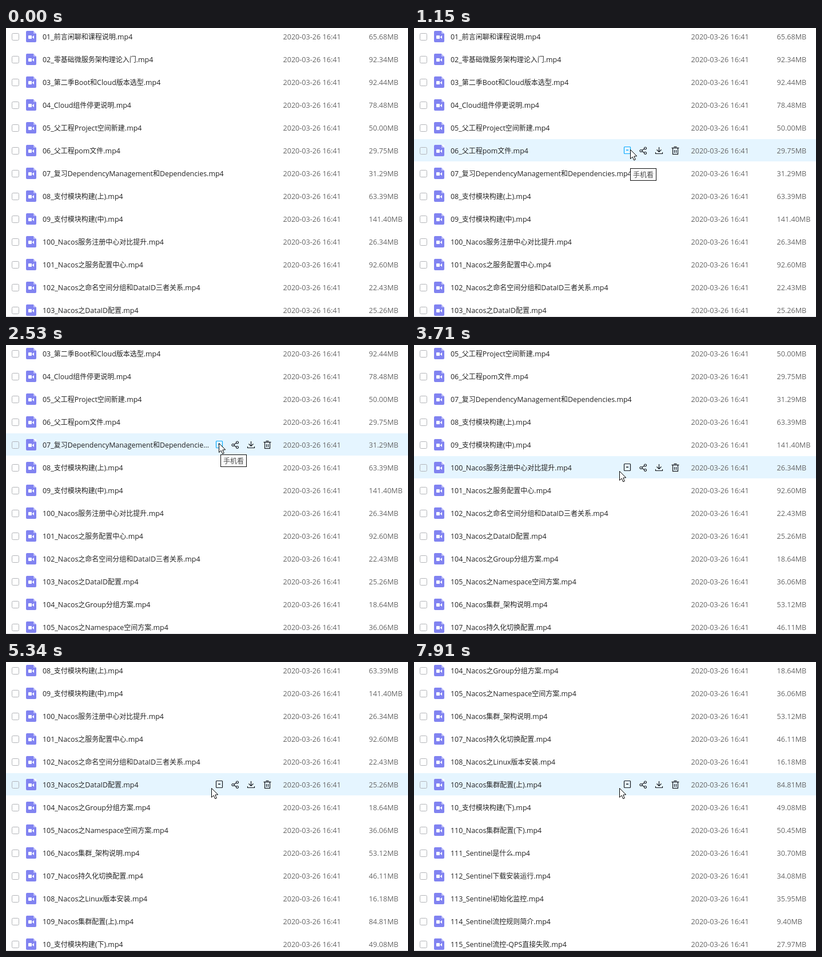
Animation of 703x507 px, one loop 8 s. Source, as an HTML page with a canvas:

```html
<!DOCTYPE html>
<html lang="zh-CN">
<head>
<meta charset="utf-8">
<style>
  html, body { margin: 0; width: 100%; height: 100%; overflow: hidden; background: #fff; }
  canvas { display: block; }
</style>
</head>
<body>
<canvas id="stage" width="703" height="507"></canvas>
<script>
const ctx = document.getElementById('stage').getContext('2d');
const LOOP = 8000, ROW = 40, VISIBLE = 13;
const DATE = '2020-03-26 16:41';
const BLUE = '#09aaff', INK = '#16181c';

const files = `01_前言闲聊和课程说明|65.68
02_零基础微服务架构理论入门|92.34
03_第二季Boot和Cloud版本选型|92.44
04_Cloud组件停更说明|78.48
05_父工程Project空间新建|50.00
06_父工程pom文件|29.75
07_复习DependencyManagement和Dependencies|31.29
08_支付模块构建(上)|63.39
09_支付模块构建(中)|141.40
100_Nacos服务注册中心对比提升|26.34
101_Nacos之服务配置中心|92.60
102_Nacos之命名空间分组和DataID三者关系|22.43
103_Nacos之DataID配置|25.26
104_Nacos之Group分组方案|18.64
105_Nacos之Namespace空间方案|36.06
106_Nacos集群_架构说明|53.12
107_Nacos持久化切换配置|46.11
108_Nacos之Linux版本安装|16.18
109_Nacos集群配置(上)|84.81
10_支付模块构建(下)|49.08
110_Nacos集群配置(下)|50.45
111_Sentinel是什么|30.70
112_Sentinel下载安装运行|34.08
113_Sentinel初始化监控|35.95
114_Sentinel流控规则简介|9.40
115_Sentinel流控-QPS直接失败|27.97`.split('\n').map(line => {
  const [name, size] = line.split('|');
  return { name: name + '.mp4', size: size + 'MB' };
});

// Wheel turns; every step moves the list by one row.
const wheel = [
  { start: 1760, steps: 2, gap: 80 },
  { start: 2770, steps: 1, gap: 1 },
  { start: 3710, steps: 6, gap: 543 },
  { start: 6900, steps: 2, gap: 90 },
  { start: 7370, steps: 2, gap: 540 }
];

// Pointer moves; each runs in even steps from where the last one ended.
const entry = { x: 495, y: 515 };
const moves = [
  { start: 70, steps: 4, gap: 70, x: 461, y: 382 },
  { start: 370, steps: 5, gap: 80, x: 378, y: 213 },
  { start: 1460, steps: 3, gap: 75, x: 374, y: 143 },
  { start: 2070, steps: 1, gap: 1, x: 372, y: 172 },
  { start: 2940, steps: 7, gap: 78, x: 359, y: 221 }
];

const tips = [
  { from: 1150, to: 1460, x: 378, y: 246 },
  { from: 2530, to: 2770, x: 375, y: 192 }
];

function stepsDone({ start, steps, gap }, t) {
  return t < start ? 0 : Math.min(steps, Math.floor((t - start) / gap) + 1);
}

function pointerAt(t) {
  return moves.reduce((p, move) => {
    const k = stepsDone(move, t) / move.steps;
    return {
      x: Math.round(p.x + (move.x - p.x) * k),
      y: Math.round(p.y + (move.y - p.y) * k)
    };
  }, entry);
}

const latinFont = size => `${size}px "Open Sans", "Noto Sans", sans-serif`;
const CJK_FONT = '12px "Noto Sans CJK SC", "Noto Sans CJK", sans-serif';

// Chinese and Latin runs differ in font size; returns the total width.
function mixedText(text, x, y, paint = true) {
  const start = x;
  for (const run of text.match(/[\u4e00-\u9fff]+|[^\u4e00-\u9fff]+/g)) {
    ctx.font = run.charCodeAt(0) >= 0x4e00 ? CJK_FONT : latinFont(12.4);
    if (paint) ctx.fillText(run, x, y);
    x += ctx.measureText(run).width;
  }
  return x - start;
}

function fitName(name, max) {
  if (mixedText(name, 0, 0, false) <= max) return name;
  while (mixedText(name + '...', 0, 0, false) > max) name = name.slice(0, -1);
  return name + '...';
}

function path(points, close) {
  ctx.beginPath();
  points.forEach(([x, y]) => ctx.lineTo(x, y));
  if (close) ctx.closePath();
}

function line(...points) {
  path(points);
  ctx.stroke();
}

function checkbox(cy) {
  ctx.strokeStyle = '#b2b4b8';
  ctx.lineWidth = 1;
  ctx.beginPath();
  ctx.roundRect(10.5, cy - 5.5, 12, 12, 2);
  ctx.stroke();
}

function videoIcon(cy) {
  const top = cy - 10;
  ctx.fillStyle = '#8183f1';
  ctx.beginPath();
  ctx.roundRect(35, top, 18, 20, 2);
  ctx.fill();
  ctx.fillStyle = '#fff';
  ctx.fillRect(48, top, 5, 5);
  ctx.fillStyle = '#bcbdf9';
  path([[48, top], [53, top + 5], [48, top + 5]], true);
  ctx.fill();
  ctx.fillStyle = '#fff';
  ctx.beginPath();
  ctx.roundRect(39, cy - 2, 6, 6, 1);
  ctx.fill();
  path([[45.5, cy + 1], [49, cy - 2], [49, cy + 4]], true);
  ctx.fill();
}

const actions = [
  function phone() {
    ctx.beginPath();
    ctx.roundRect(-5.5, -6.5, 11, 12, 1);
    ctx.stroke();
    ctx.fillRect(-2, -1.5, 4, 1.5);
  },
  function share() {
    for (const [x, y] of [[-4, 0.5], [3.5, -4], [3.5, 4.5]]) {
      ctx.beginPath();
      ctx.arc(x, y, 2, 0, Math.PI * 2);
      ctx.stroke();
    }
    line([-2.2, -0.5], [1.8, -3]);
    line([-2.2, 1.5], [1.8, 3.6]);
  },
  function download() {
    line([-0.5, -6], [-0.5, 2.5]);
    line([-4.5, -1.5], [-0.5, 2.5], [3.5, -1.5]);
    line([-6.5, 3], [-6.5, 5.5], [5.5, 5.5], [5.5, 3]);
  },
  function trash() {
    line([-6.5, -4.5], [6.5, -4.5]);
    line([-2.5, -6.5], [2.5, -6.5]);
    ctx.strokeRect(-4.5, -4.5, 9, 11);
    line([-1.5, -1], [-1.5, 4]);
    line([1.5, -1], [1.5, 4]);
  }
];

function drawActions(cy, pointer) {
  actions.forEach((draw, i) => {
    const x = 373 + 28 * i;
    const over = Math.abs(pointer.x - x) < 8 && Math.abs(pointer.y - cy) < 9;
    ctx.save();
    ctx.translate(x, cy);
    ctx.strokeStyle = ctx.fillStyle = over ? BLUE : INK;
    ctx.lineWidth = 1.2;
    draw();
    ctx.restore();
  });
}

function drawRow(file, i, pointer) {
  const cy = i * ROW + 15, base = cy + 5;
  const hovered = Math.floor((pointer.y + 5) / ROW) === i;
  if (hovered) {
    ctx.fillStyle = '#e5f5ff';
    ctx.fillRect(0, cy - 20, 703, 39);
  }
  checkbox(cy);
  videoIcon(cy);
  ctx.fillStyle = '#222';
  mixedText(hovered ? fitName(file.name, 292) : file.name, 64, base);
  ctx.fillStyle = '#666';
  ctx.font = latinFont(12.6);
  ctx.fillText(DATE, 484.5, base);
  ctx.fillText(file.size, 634.5, base);
  if (hovered) drawActions(cy, pointer);
}

function drawTip({ x, y }) {
  ctx.fillStyle = '#fafafa';
  ctx.fillRect(x, y, 46, 22);
  ctx.strokeStyle = '#111';
  ctx.lineWidth = 1;
  ctx.strokeRect(x + 0.5, y + 0.5, 45, 21);
  ctx.fillStyle = '#4c4c4c';
  mixedText('手机看', x + 5, y + 16);
}

function drawPointer({ x, y }) {
  ctx.save();
  ctx.translate(x + 0.5, y + 0.5);
  path([[0, 0], [0, 16], [3.6, 12.6], [6.2, 18.4], [8.8, 17.3], [6.3, 11.6], [11.2, 11.2]], true);
  ctx.fillStyle = '#fff';
  ctx.fill();
  ctx.strokeStyle = '#000';
  ctx.lineWidth = 1;
  ctx.stroke();
  ctx.restore();
}

function render(t) {
  ctx.fillStyle = '#fff';
  ctx.fillRect(0, 0, 703, 507);
  const first = wheel.reduce((sum, turn) => sum + stepsDone(turn, t), 0);
  const pointer = pointerAt(t);
  files.slice(first, first + VISIBLE).forEach((file, i) => drawRow(file, i, pointer));
  ctx.fillStyle = '#d9d9dc';
  ctx.fillRect(0, 506, 703, 1);
  tips.filter(tip => t >= tip.from && t < tip.to).forEach(drawTip);
  drawPointer(pointer);
}

function tick() {
  render(performance.now() % LOOP);
  requestAnimationFrame(tick);
}
tick();
</script>
</body>
</html>
```
